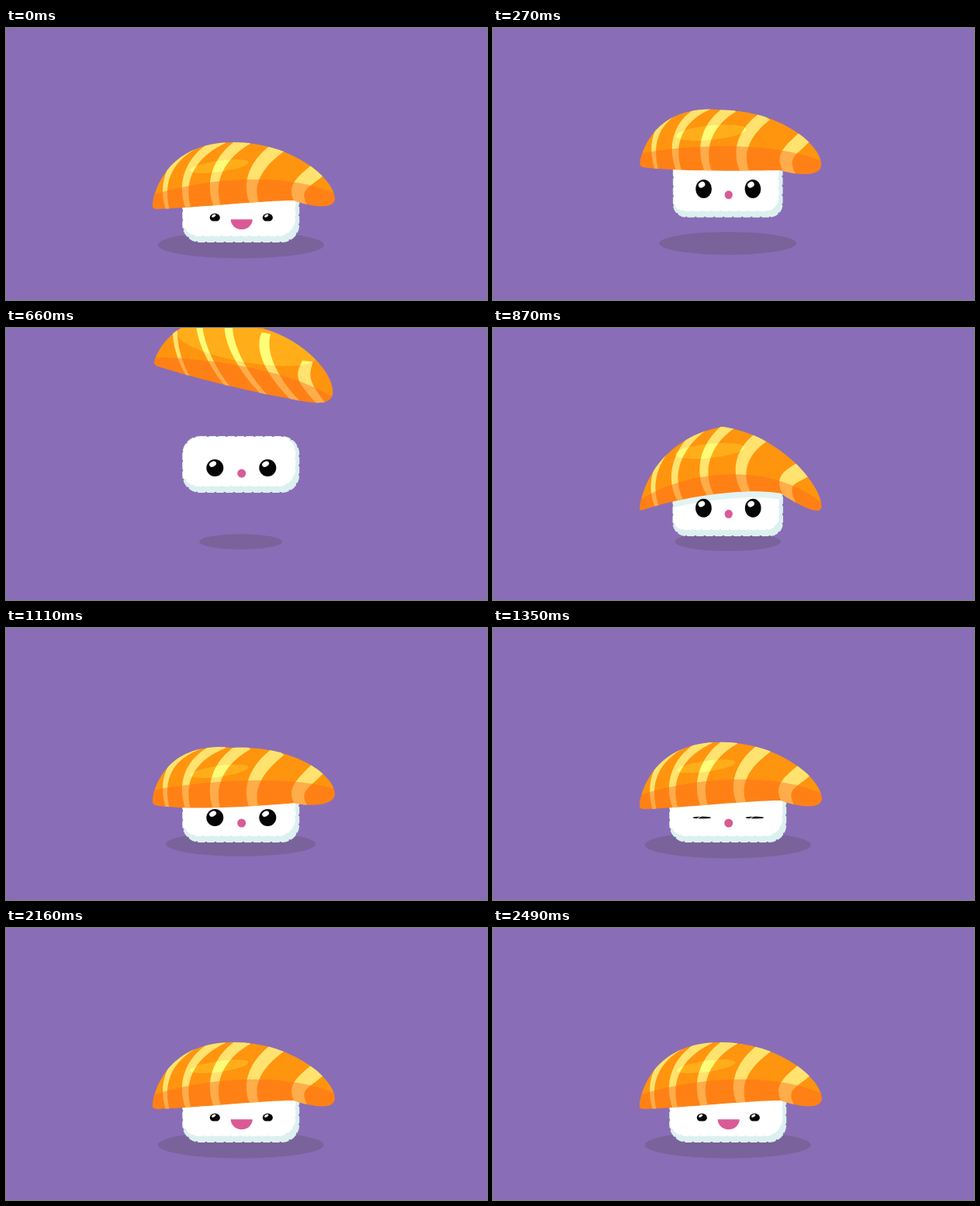
Write an HTML page with a canvas that moves like this. It is 620x350 px and loops after 2730 ms.

```html
<!DOCTYPE html>
<html lang="en">
<head>
<meta charset="utf-8">
<title>Sushi hop</title>
<style>
html, body { margin: 0; width: 100%; height: 100%; overflow: hidden; background: #8a6db7; }
canvas { display: block; width: 620px; height: 350px; }
</style>
</head>
<body>
<canvas id="stage" width="620" height="350"></canvas>
<script>
const ctx = document.getElementById('stage').getContext('2d');
const LOOP = 2730, STEP = 30, CX = 302.7;
const JUMP = 180, LAND = 890;

const mix = (a, b, k) => a + (b - a) * k;
const clamp = k => Math.min(1, Math.max(0, k));
const span = (t, a, b) => clamp((t - a) / (b - a));
const ease = (t, a, b) => (1 - Math.cos(Math.PI * span(t, a, b))) / 2;
const pulse = (t, mid, width) => Math.exp(-(((t - mid) / width) ** 2));
const hop = (t, mid, half) => Math.max(0, 1 - ((t - mid) / half) ** 2);

function fill(path, color) {
  ctx.fillStyle = color;
  ctx.fill(path);
}

function oval(x, y, rx, ry, color, turn = 0) {
  const path = new Path2D();
  path.ellipse(x, y, rx, ry, turn, 0, 2 * Math.PI);
  fill(path, color);
}

// Start point followed by triples of Bezier points
function bezier([first, ...rest], warp) {
  const path = new Path2D();
  path.moveTo(...warp(first));
  for (let i = 0; i < rest.length; i += 3) {
    path.bezierCurveTo(...rest.slice(i, i + 3).flatMap(warp));
  }
  return path;
}

// Tilt in the air, bend that keeps swinging after the landing, roll of the stripes
function fishPose(t) {
  const q = span(t, JUMP, LAND), rest = t - LAND;
  const bend = rest < 0
    ? 38 * q ** 8 - 13 * Math.sqrt(Math.sin(Math.PI * q))
    : 38 * Math.exp(-rest / 250) * Math.cos(2 * Math.PI * rest / 370);
  return {
    bend,
    tilt: 28 * Math.sin(Math.PI * q ** 1.3),
    roll: 1.5 * Math.sin(Math.PI * q ** 1.5) ** 1.2,
    lift: -175 * hop(t, 550, 325) - .55 * bend
  };
}

function fishWarp({ bend, tilt, lift }) {
  return ([x, y]) => {
    const u = (x - 306) / 118;
    return [
      306 + (x - 306) * (1 - tilt * .0012) - tilt / 118 * (y - 222),
      y + lift + tilt * u + bend * u * u
    ];
  };
}

function fishBody(roll, warp) {
  const sag = 7 * Math.min(1, roll);
  return bezier([
    [189, 228], [189, 215], [205, 147], [293, 147],
    [370, 147], [424, 195], [424, 219],
    [424, 233], [400, 232], [371, 222 + sag],
    [330, 222 + sag], [250, 231], [195, 233],
    [190, 233], [188, 231], [189, 228]
  ], warp);
}

// Stripes widen to the right and lean with the roll
function stripe(i, roll, warp) {
  const air = Math.min(1, roll), x = 202 + 22 * i + 5.6 * i * i;
  const top = 148 + .16 * Math.max(0, x - 290) ** 1.2;
  const w = 2.6 + 1.1 * i;
  const a = x + mix(58 - 8 * i, 2, air), b = x + 7 + 48 * roll * Math.sin(Math.PI * (i + .8) / 5.6);
  const bow = x - mix(6, 10, air), low = mix(a, b, .6) - mix(30, 22, air);
  const side = (s, dy) => [
    [a + s * w, top - 4 + dy], [bow + s * w * 1.3 + 8, top + 18 + dy],
    [low + s * w * 1.3, 205], [b + s * w * .9, 236]
  ];
  const left = side(-1, -w * (1 - air)), right = side(1, w * (1 - air)).reverse();
  const path = bezier(left, warp);
  const edge = right.map(warp);
  path.lineTo(...edge[0]);
  path.bezierCurveTo(...edge.slice(1).flat());
  path.closePath();
  return path;
}

function drawFish(body, roll, warp) {
  const air = Math.min(1, roll), shift = 9 * air;
  ctx.save();
  ctx.clip(body);
  fill(body, '#ff940f');
  for (let i = 0; i < 5; i++) fill(stripe(i, roll, warp), '#ffe36e');

  ctx.globalCompositeOperation = 'lighter';
  const [x, y] = warp([mix(275, 300, air), mix(178, 172, air)]);
  oval(x, y, mix(38, 92, air), mix(7, 23, air), '#001a0a', mix(-.14, .17, air));
  ctx.globalCompositeOperation = 'source-over';

  const band = bezier([
    [180, 218 + shift], [260, 190 + shift], [370, 185 + shift], [430, 216 + shift],
    [430, 226], [430, 236], [430, 248], [350, 248], [260, 248], [180, 248]
  ], warp);
  fill(band, 'rgba(255,105,30,.45)');
  ctx.restore();
}

// Rounded block with a softly grained edge
function grains(x, y, w, h, r, color) {
  const path = new Path2D();
  path.roundRect(x + 1, y + 1, w - 2, h - 2, r);
  fill(path, color);
  ctx.strokeStyle = color;
  ctx.lineWidth = 2;
  ctx.lineCap = 'round';
  ctx.setLineDash([8, 4]);
  ctx.stroke(path);
  return path;
}

function drawRice(base, stretch, body, bend) {
  const w = 151 - 14 * stretch, h = 73 + 9 * stretch, r = 22 - 9 * clamp(stretch);
  const x = CX - w / 2, y = base - h;
  const block = grains(x, y, w, h, r, '#dcf0f0');
  ctx.save();
  ctx.clip(block);
  grains(x - 1, y - 1, w - 4, h - 7, r, '#fff');
  if (bend > 0) {
    ctx.translate(0, bend * .3);
    fill(body, '#e2f3f3');
  }
  ctx.restore();
}

function drawFace(t, base, stretch) {
  const smile = 1 - ease(t, JUMP, 270) + ease(t, 1890, 2070);
  const blink = pulse(t, 1350, 40);
  const y = base - 32 - 7 * stretch;
  const rx = mix(11 - stretch, 6.6, smile) + blink;
  const ry = mix(mix(11 + 1.5 * stretch, 5.4, smile), 1.4, blink);
  for (const side of [-1, 1]) {
    const x = CX + .6 + side * (34 - 3.5 * stretch);
    ctx.save();
    ctx.beginPath();
    ctx.rect(x - 20, y - 20, 40, 20 + ry * mix(1.1, .85, smile));
    ctx.clip();
    oval(x, y, rx, ry, '#050505');
    oval(x - rx * .25, y - ry * .45, rx * .43, ry * .3, '#fff', -.5);
    ctx.restore();
  }
  const mx = mix(5.5 - .6 * stretch, 14, smile), my = y + mix(7 + stretch, 2.2, smile);
  const mouth = new Path2D();
  mouth.ellipse(CX + 1, my, mx, mix(5.5, 0, smile), 0, Math.PI, 2 * Math.PI);
  mouth.ellipse(CX + 1, my, mx, mix(5.5, 13, smile), 0, 0, Math.PI);
  fill(mouth, '#da5a96');
}

// Shrinks quickly at the jump, spreads again with growing speed
function drawShadow(t) {
  const w = 214 - 119 * (ease(t, JUMP, 420) - span(t, 420, 1180) ** 2);
  oval(CX, 275 + Math.max(0, w - 137) / 19, w / 2, w * .07 + 2.3, '#7a629b');
}

function draw(t) {
  const stretch = 1.3 * pulse(t, 360, 110) + .8 * pulse(t, 840, 60) - .8 * pulse(t, 950, 40);
  const base = 276 - 73 * hop(t, 535, 355);
  const pose = fishPose(t), warp = fishWarp(pose), body = fishBody(pose.roll, warp);
  ctx.fillStyle = '#8a6db7';
  ctx.fillRect(0, 0, 620, 350);
  drawShadow(t);
  drawRice(base, stretch, body, pose.bend);
  drawFace(t, base, stretch);
  drawFish(body, pose.roll, warp);
}

const start = performance.now();
function tick() {
  const t = (performance.now() - start) % LOOP;
  draw(Math.floor(t / STEP) * STEP);
  requestAnimationFrame(tick);
}
tick();
</script>
</body>
</html>
```
